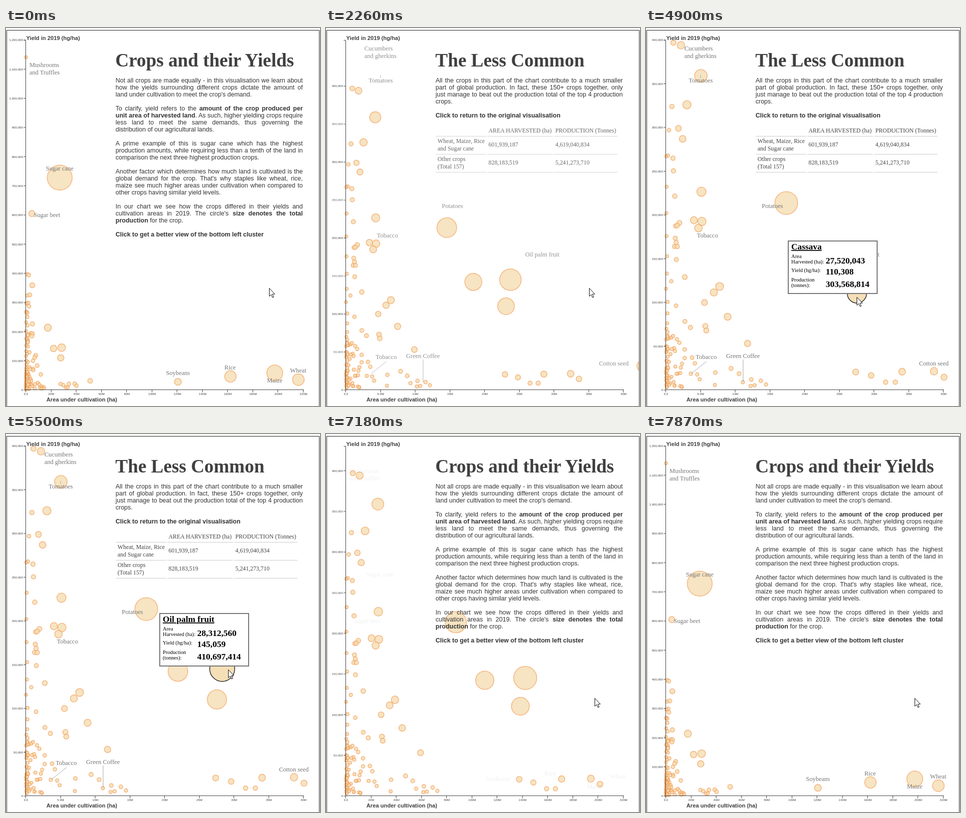
These frames come from a looping animation (629 by 756 pixels, 8.83 s). An HTML page:

```html
<!DOCTYPE html>
<html lang="en">
<head>
<meta charset="utf-8">
<title>Crops and their Yields</title>
<style>
html, body { margin: 0; width: 100%; height: 100%; overflow: hidden; background: #fff; }
svg { position: absolute; left: 0; top: 0; }
.story { position: absolute; left: 219.5px; top: 98px; width: 375px; color: #333;
  font: 12.5px/14px "Liberation Sans", Arial, sans-serif; white-space: nowrap; }
.story div { height: 14px; text-align: justify; text-align-last: justify; }
.story .last { text-align-last: left; }
svg text { font-family: "Liberation Serif", "Times New Roman", serif; }
.title { font-size: 37.33px; font-weight: bold; fill: #404040; }
.label { font-size: 12.5px; fill: #777; }
.cell { font-size: 11.9px; fill: #444; }
svg .axis, svg .tick { font-family: "Liberation Sans", Arial, sans-serif; fill: #404040; }
.axis { font-size: 11.2px; font-weight: bold; }
.tick { font-size: 6.2px; }
.line { stroke: #444; fill: none; }
.crop { fill: wheat; stroke: sandybrown; stroke-width: 1.5; opacity: .8; }
.crop.hover { stroke: #222; opacity: .95; }
.tip-head { font-size: 17.4px; font-weight: bold; text-decoration: underline; }
.tip-name { font-size: 10.6px; }
.tip-value { font-size: 17.5px; font-weight: bold; }
</style>
</head>
<body>
<svg id="stage" width="629" height="756"></svg>
<div class="story" id="overviewStory"></div>
<div class="story" id="clusterStory"></div>
<script>
const LOOP = 8830, ZOOM_IN = 1628, ZOOM_OUT = 6883, ZOOM_TIME = 1000;
const X0 = 40, Y0 = 724, WIDTH = 556, HEIGHT = 700;

// Pairs of area (10,000 ha) and yield (1,000 hg/ha).
const crops = [
  2677,728, 461,605, 2,1141, 12043,28, 19720,58.2, 21590,35.5, 16206,46.6, 5090,31.5,
  108,397, 216,394, 503,359, 86,324, 302,326, 180,299, 43,297, 240,287, 29,268,
  101,265, 108,250.5, 511,226.6, 127,221.5, 1734,213.7, 403,194, 518,192.6, 194,191,
  140,187.5, 162,188, 468,185, 134,173.5, 147,168.6, 122,164, 162,164, 150,149,
  2190,142.3, 2828,145.2, 2752,110.3, 272,129, 76,124.3, 773,118.3, 690,111.5,
  555,100, 146,96.3, 888,83.7, 273,78.3, 352,71.5, 568,73, 581,68, 158,58, 193,54,
  1176,53.2, 270,46.3, 270,36.5, 377,37, 417,30.5, 358,18.6, 450,17.7, 712,20,
  939,24.6, 1054,18.6, 1108,9, 1230,12, 1368,10.5, 1277,5.4, 1219,4.6, 1442,6.3,
  2734,20.6, 2957,16.6, 3165,9, 3305,9, 3403,20.9, 3863,21.4, 4007,14.6,
  485,12.3, 705,5.7
];
const noise = i => { const v = Math.sin(i * 12.9898 + 4) * 43758.5453; return v - Math.floor(v); };
for (let i = 0; i < 25; i++) crops.push(25 * noise(i) ** 2, 267 * .87 ** i);
for (let i = 30; i < 78; i++) crops.push(4 + 230 * noise(i) ** 2, 3 + 68 * noise(i + 100) ** 2);

const overview = { area: 22000, yield: 1200, production: 1949 };
const cluster = { area: 4000, yield: 400, production: 411 };
const place = (area, yld, view) => [
  X0 + area / view.area * WIDTH,
  Y0 - yld / view.yield * HEIGHT,
  3 + 22 * area * yld / 1000 / view.production
];

const text = (kind, x, y, value, extra = "") => `<text class="${kind}" x="${x}" y="${y}" ${extra}>${value}</text>`;
const texts = (kind, rows) => rows.map(row => text(kind, ...row)).join("");
const path = (d, color, extra = "") => `<path d="${d}" fill="none" stroke="${color}" ${extra}/>`;

let circles = "", yTicks = "";
for (let i = 0; i < crops.length; i += 2) circles += `<circle class="crop"/>`;
const tickValues = [];
for (let v = 0; v <= 1200; v += 50) if (v % 100 === 0 || v < 400) tickValues.push(v);
for (const v of tickValues) {
  const name = (v * 1000).toLocaleString("en-US");
  yTicks += `<g>${path("M35.5 0H39.5", "#444")}${text("tick", 34, 2.2, name, 'text-anchor="end"')}</g>`;
}

function xTicks(step, count) {
  let out = "";
  for (let i = 0; i <= count; i++) {
    const x = X0 + WIDTH * i / count, v = step * i;
    const name = v === 0 ? "0.0" : v < 10 ? v.toFixed(1) + "M" : v + "M";
    out += path(`M${Math.round(x) - .5} 723.5V728.5`, "#444") + text("tick", x, 733.8, name, 'text-anchor="middle"');
  }
  return out;
}

const overviewLabels = texts("label", [
  [47, 78, "Mushrooms"], [47, 93, "and Truffles"], [80, 285, "Sugar cane"], [55.5, 378, "Sugar beet"],
  [320.5, 694, "Soybeans"], [437.5, 683, "Rice"], [522.5, 709, "Maize"], [569, 689, "Wheat"]
]);
const clusterLabels = texts("label", [
  [77, 45, "Cucumbers"], [77, 60, "and gherkins"], [85.5, 109, "Tomatoes"], [102, 419, "Tobacco"],
  [232, 360, "Potatoes"], [399, 457, "Oil palm fruit"], [99.5, 662, "Tobacco"],
  [160.5, 660, "Green Coffee"], [547, 675, "Cotton seed"]
]) + path("M121 667L91 691M194.5 663V708M109.5 94V100", "#aaa");
const table = texts("cell", [
  [325.5, 209, "AREA HARVESTED (ha)"], [459.5, 209, "PRODUCTION (Tonnes)"],
  [223.5, 230, "Wheat, Maize, Rice"], [223.5, 245, "and Sugar cane"],
  [325.5, 237, "601,939,187"], [459.5, 237, "4,619,040,834"],
  [223.5, 266, "Other crops"], [223.5, 281, "(Total 157)"],
  [325.5, 272.5, "828,183,519"], [459.5, 272.5, "5,241,273,710"]
]) + [216.5, 252.5, 288.5].map(y => path(`M220 ${y}H321M323 ${y}H455M457 ${y}H584`, "#ccc")).join("");

const $ = id => document.getElementById(id);
$("stage").innerHTML = `
  <clipPath id="inside"><rect x="2" y="5" width="625" height="760"/></clipPath>
  <g clip-path="url(#inside)">
    <g id="crops">${circles}</g>
    <g id="yTicks">${yTicks}</g>
  </g>
  ${path("M35.5 24.5H39.5V723.5H596.5M595.5 723.5V728.5", "#444")}
  ${text("axis", 40.5, 24, "Yield in 2019 (hg/ha)")}${text("axis", 81, 747, "Area under cultivation (ha)")}
  <g id="overview">${xTicks(20, 11)}${text("title", 219, 77, "Crops and their Yields")}<g id="overviewFade">${overviewLabels}</g></g>
  <g id="cluster">${xTicks(5, 8)}${text("title", 219, 77, "The Less Common")}<g id="clusterFade">${clusterLabels}${table}</g></g>
  ${path("M1.5 760V4.5H627.5V760", "#222")}
  <g id="tip">
    <rect x="1" y="1" width="178" height="105" fill="#fff" stroke="#777" stroke-width="2"/>
    ${text("tip-head", 7, 18, "", 'id="tipHead"')}
    ${texts("tip-name", [[7, 35, "Area"], [7, 46, "Harvested (ha):"], [7, 63, "Yield (hg/ha):"], [7, 82, "Production"], [7, 93, "(tonnes):"]])}
    ${[46, 68, 93].map(y => text("tip-value", 76, y, "")).join("")}
  </g>
  <g id="cursor">
    <circle id="click" r="15" fill="#ff0" opacity=".6"/>
    <path d="M.5 .5V16.5L4.2 13.2 6.8 19 9.2 18 6.7 12.2H11.5Z" fill="#fff" stroke="#111"/>
  </g>`;

// One line per row; a blank row ends a paragraph.
function fillStory(id, copy) {
  const rows = copy.trim().split("\n");
  $(id).innerHTML = rows.map((row, i) => `<div class="${rows[i + 1] ? "" : "last"}">${row}</div>`).join("");
}
fillStory("overviewStory", `
Not all crops are made equally - in this visualisation we learn about
how the yields surrounding different crops dictate the amount of
land under cultivation to meet the crop's demand.

To clarify, yield refers to the <b>amount of the crop produced per</b>
<b>unit area of harvested land</b>. As such, higher yielding crops require
less land to meet the same demands, thus governing the
distribution of our agricultural lands.

A prime example of this is sugar cane which has the highest
production amounts, while requiring less than a tenth of the land in
comparison the next three highest production crops.

Another factor which determines how much land is cultivated is the
global demand for the crop. That's why staples like wheat, rice,
maize see much higher areas under cultivation when compared to
other crops having similar yield levels.

In our chart we see how the crops differed in their yields and
cultivation areas in 2019. The circle's <b>size denotes the total</b>
<b>production</b> for the crop.

<b>Click to get a better view of the bottom left cluster</b>`);
fillStory("clusterStory", `
All the crops in this part of the chart contribute to a much smaller
part of global production. In fact, these 150+ crops together, only
just manage to beat out the production total of the top 4 production
crops.

<b>Click to return to the original visualisation</b>`);

const hoverable = [
  { area: 2752, yield: 110.3, rows: ["Cassava", "27,520,043", "110,308", "303,568,814"] },
  { area: 2828, yield: 145.2, rows: ["Oil palm fruit", "28,312,560", "145,059", "410,697,414"] }
];

const cursorPath = [
  [0, 527, 520], [3900, 527, 520], [4180, 468, 555], [4350, 435.5, 546], [4740, 435.5, 546],
  [4890, 422, 538], [4950, 422, 538], [5080, 414.5, 529], [5250, 420, 508], [5400, 428, 480],
  [5480, 440, 470], [5640, 481, 477], [6060, 538, 528], [LOOP, 538, 528]
];
const mix = (a, b, k) => a + (b - a) * k;
function cursorAt(t) {
  const i = cursorPath.findIndex(p => p[0] > t);
  const [t0, x0, y0] = cursorPath[i - 1], [t1, x1, y1] = cursorPath[i];
  const k = (t - t0) / (t1 - t0);
  return [mix(x0, x1, k), mix(y0, y1, k)];
}
function ease(k) {
  k = Math.min(1, Math.max(0, k));
  return k < .5 ? 4 * k ** 3 : 1 - 4 * (1 - k) ** 3;
}

const circleNodes = [...$("crops").children], tickNodes = [...$("yTicks").children];
const tipValues = [...document.querySelectorAll(".tip-value")];
const show = (id, on) => { $(id).style.display = on ? "" : "none"; };

function draw(t) {
  const zoom = ease((t - ZOOM_IN) / ZOOM_TIME) - ease((t - ZOOM_OUT) / ZOOM_TIME);
  const zoomed = t >= 1650 && t < 6890;
  const [cx, cy] = cursorAt(t);
  const hovered = zoomed && hoverable.find(c => {
    const [x, y, r] = place(c.area, c.yield, cluster);
    return Math.hypot(cx - x, cy - y) < r + .5;
  });

  circleNodes.forEach((node, i) => {
    const area = crops[2 * i], yld = crops[2 * i + 1];
    const from = place(area, yld, overview), to = place(area, yld, cluster);
    ["cx", "cy", "r"].forEach((name, j) => node.setAttribute(name, mix(from[j], to[j], zoom)));
    node.classList.toggle("hover", !!hovered && hovered.area === area);
  });

  const scale = mix(HEIGHT / overview.yield, HEIGHT / cluster.yield, zoom);
  tickNodes.forEach((node, i) => {
    const v = tickValues[i];
    node.setAttribute("transform", `translate(0 ${Y0 - v * scale})`);
    node.setAttribute("opacity", v % 100 ? zoom : v > 400 ? 1 - zoom : 1);
  });

  for (const id of ["overview", "overviewStory"]) show(id, !zoomed);
  for (const id of ["cluster", "clusterStory"]) show(id, zoomed);
  $("overviewFade").setAttribute("opacity", 1 - zoom);
  $("clusterFade").setAttribute("opacity", zoom);

  show("tip", hovered);
  if (hovered) {
    $("tip").setAttribute("transform", `translate(${Math.round(cx) - 138} ${Math.round(cy) - 113})`);
    $("tipHead").textContent = hovered.rows[0];
    tipValues.forEach((node, i) => { node.textContent = hovered.rows[i + 1]; });
  }
  $("cursor").setAttribute("transform", `translate(${Math.round(cx)} ${Math.round(cy)})`);
  show("click", (t >= 1510 && t < 1650) || (t >= 6750 && t < 6890));
}

const start = performance.now();
function frame() {
  draw((performance.now() - start) % LOOP);
  requestAnimationFrame(frame);
}
frame();
</script>
</body>
</html>
```
